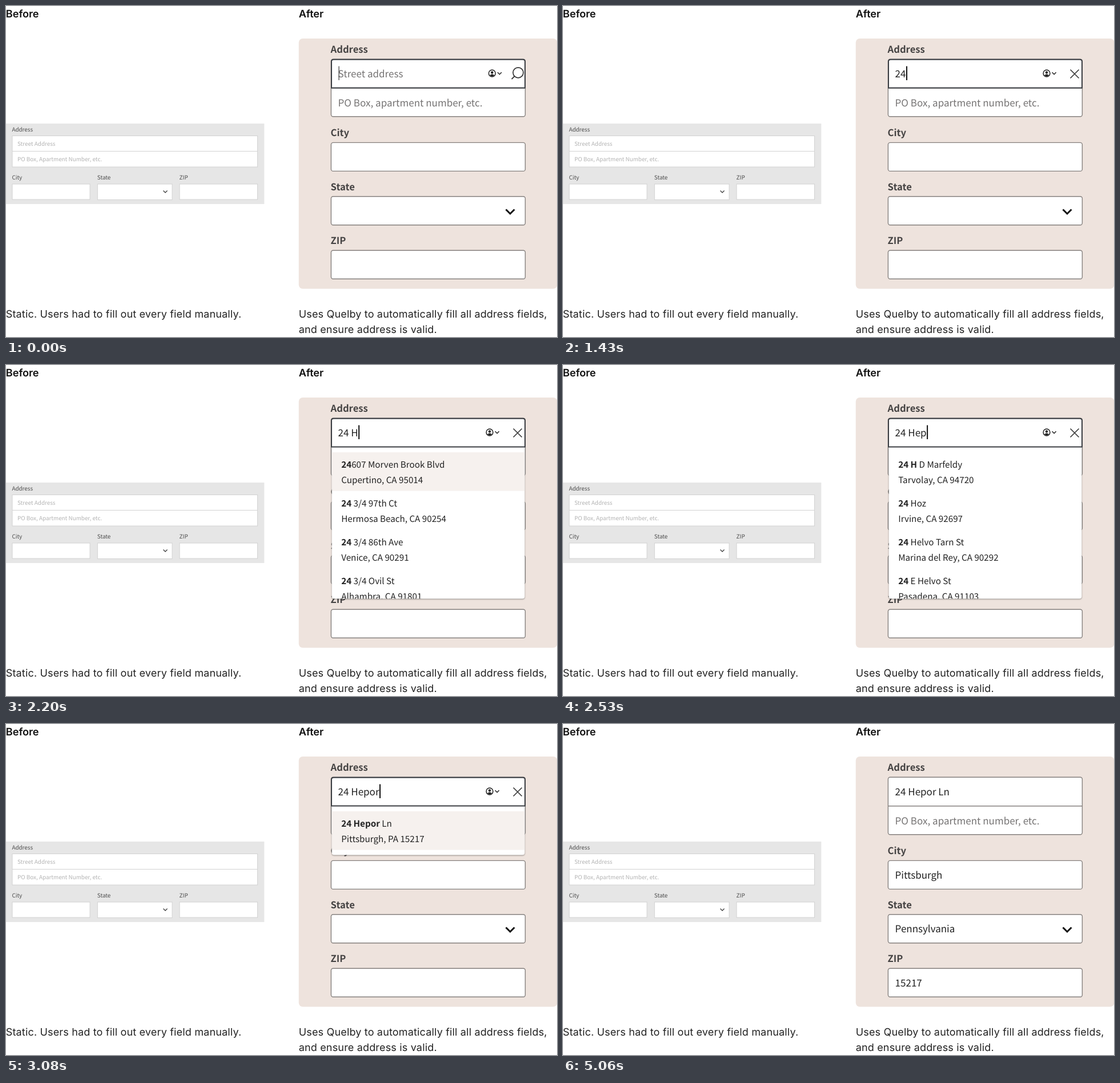
Animation of 965x580 px, one loop 7590 ms. Source, as an HTML page:

```html
<!DOCTYPE html>
<html lang="en">
<head>
<meta charset="utf-8">
<title>Address form, before and after</title>
<style>
  html, body { margin: 0; width: 100%; height: 100%; overflow: hidden; background: #fff; }
  svg { display: block; }
  text {
    font-family: "Noto Sans CJK JP", "Noto Sans CJK SC", "Noto Sans CJK", "Noto Sans", sans-serif;
    text-rendering: geometricPrecision;
    white-space: pre;
  }
  .page { font-family: Inter, sans-serif; font-optical-sizing: none; }
  .menu { filter: drop-shadow(0 1px 1.2px rgba(0, 0, 0, .4)); }
</style>
</head>
<body>
<svg id="stage" width="965" height="580" viewBox="0 0 965 580">
  <g id="fixed"></g>
  <g id="live"></g>
</svg>
<script>
const LOOP = 7590, TEXT_X = 581.6;
const INK = '#222', LABEL = '#454343', HINT = '#757373', EDGE = '#85807e';
const fixed = document.getElementById('fixed');
const live = document.getElementById('live');

const text = (x, y, s, size, fill, attrs = '') =>
  `<text x="${x}" y="${y}" font-size="${size}" fill="${fill}" ${attrs}>${s}</text>`;
const box = (x, y, w, h, fill, attrs = '') =>
  `<rect x="${x}" y="${y}" width="${w}" height="${h}" fill="${fill}" ${attrs}/>`;
const line = (d, color, width, attrs = '') =>
  `<path d="${d}" fill="none" stroke="${color}" stroke-width="${width}" ${attrs}/>`;

const heading = (x, s) => text(x, 20.4, s, 18.15, '#111', 'class="page" font-weight="600"');
const caption = (x, y, s) => text(x, y, s, 18, '#222', 'class="page" letter-spacing=".17"');
const small = (x, y, s, fill = '#4c4c4c') => text(x, y, s, 9.87, fill);
const smallField = (x, y, w, h) => box(x, y, w, h, '#fff', 'stroke="#d2d2d2"');
const label = (y, s) => text(568.6, y, s, 16.6, LABEL, 'font-weight="700"');
const entry = (y, s, fill = INK) => text(TEXT_X, y, s, 17, fill);
const field = (y, h = 50) =>
  box(569.4, y, 340, h, '#fff', `rx="3.5" stroke="${EDGE}" stroke-width="1.4"`);

fixed.innerHTML =
  heading(-.3, 'Before') + heading(512.7, 'After') +
  caption(-.3, 546, 'Static. Users had to fill out every field manually.') +
  caption(512.7, 546, 'Uses Quelby to automatically fill all address fields,') +
  caption(512.7, 573, 'and ensure address is valid.') +

  box(0, 206, 452.3, 141, '#e6e6e6') +
  small(10.4, 219.6, 'Address') +
  smallField(11, 227.5, 429.5, 54.5) + line('M11 254.5H440.5', '#d2d2d2', 1) +
  small(20, 245, 'Street Address', '#b3b3b3') +
  small(20, 272.4, 'PO Box, Apartment Number, etc.', '#b3b3b3') +
  small(10.4, 304.4, 'City') + smallField(11, 312, 136, 27) +
  small(159.8, 304.4, 'State') + smallField(160.3, 312, 130.7, 27.5) +
  small(303.6, 304.4, 'ZIP') + smallField(304, 312, 136.5, 27) +
  line('M275.5 323.5L279 327L282.5 323.5', '#444', 1.4) +

  box(512.7, 57, 452.6, 438.5, '#eee3dd', 'rx="7"') +
  label(82, 'Address') + field(93.3, 100.4) +
  line('M569.4 143.8H909.4', EDGE, 1.4) +
  entry(175.9, 'PO Box, apartment number, etc.', HINT) +
  label(228.3, 'City') + field(239.4) +
  label(322.7, 'State') + field(333.8) +
  label(417.1, 'ZIP') + field(428.2) +
  line('M875.5 356.5L883 364L890.5 356.5', '#111', 3);

// Each suggestion: matched part, rest of the street, city
const wide = [
  ['24', '607 Morven Brook Blvd', 'Cupertino, CA 95014'],
  ['24', ' 3/4 97th Ct', 'Hermosa Beach, CA 90254'],
  ['24', ' 3/4 86th Ave', 'Venice, CA 90291'],
  ['24', ' 3/4 Ovil St', 'Alhambra, CA 91801'],
];
const narrow = [
  ['24 H', ' D Marfeldy', 'Tarvolay, CA 94720'],
  ['24', ' Hoz', 'Irvine, CA 92697'],
  ['24', ' Helvo Tarn St', 'Marina del Rey, CA 90292'],
  ['24', ' E Helvo St', 'Pasadena, CA 91103'],
];
const single = [['24 Hepor', ' Ln', 'Pittsburgh, PA 15217']];

const WARM = '#f6f1ee', HOVER = '#ededee';
// Start time, typed text, suggestions, colour of the active suggestion
const steps = [
  [0, ''],
  [1100, '2'],
  [1430, '24'],
  [1540, '24', wide],
  [1760, '24 ', wide],
  [1870, '24 ', wide, WARM],
  [2090, '24 H', wide, WARM],
  [2310, '24 He', narrow],
  [2530, '24 Hep', narrow],
  [2750, '24 Hepo', narrow],
  [2860, '24 Hepor', narrow],
  [2970, '24 Hepor', single],
  [3080, '24 Hepor', single, WARM],
  [4510, '24 Hepor', single, HOVER],
];
const FILLED = 4620;

function caretOpacity(t) {
  if (t < 110) return .5;
  if (t < 1100) return t >= 440 && t < 770 ? 1 : 0;
  if (t < 3520 || t >= 4290) return 1;
  return Math.abs(Math.cos(Math.PI * (Math.floor((t - 3520) / 110) + 1) / 8));
}

function menu(items, active) {
  const bottom = items.length > 1 ? 409.6 : 229.6;
  const shape = `M570.6 144H908.4V${bottom - 4}q0 4 -4 4H574.6q-4 0 -4 -4Z`;
  const rows = items.map(([match, rest, city], i) => {
    const y = 179.6 + 68 * i;
    return text(587.2, y, `<tspan font-weight="700">${match}</tspan>${rest}`, 15.23, INK) +
      text(587.2, y + 27.6, city, 15.23, INK);
  }).join('');
  return `<clipPath id="cut"><path d="${shape}"/></clipPath>
    <path class="menu" d="${shape}" fill="#fff"/>
    <g clip-path="url(#cut)">${active ? box(570.6, 153, 337.8, 67.6, active) : ''}${rows}</g>`;
}

const account = x =>
  `<g transform="translate(${x} 118)">
    <circle r="5.9" fill="#fff" stroke="#222" stroke-width="1.5"/>
    <circle cy="-1.5" r="2.2" fill="#222"/>
    <path d="M-4 3.6Q0 -.6 4 3.6Q0 7 -4 3.6Z" fill="#222"/>
    <path d="M9.6 -1.8L13.1 1.7L16.6 -1.8" fill="none" stroke="#222" stroke-width="1.5"/>
  </g>`;

function editing([, typed, items, active]) {
  const action = typed
    ? line('M888.5 111.5L903.5 126.5M903.5 111.5L888.5 126.5', '#3c3c3c', 1.7)
    : line('M890.5 123.2L885.6 128.2', '#333', 1.9) +
      '<circle cx="897" cy="116.8" r="9" fill="none" stroke="#333" stroke-width="1.7"/>';
  return (items ? menu(items, active) : '') +
    line('M570 143.4V97.5q0 -3.7 3.7 -3.7H905.3q3.7 0 3.7 3.7V143.4Z', '#3b3e43', 2) +
    (typed ? '' : entry(124.8, 'Street address', HINT)) +
    entry(124.8, typed, INK).replace('<text', '<text id="typed"') +
    account(typed ? 847 : 851.3) + action +
    box(TEXT_X, 105.5, 2, 24.5, '#111', 'id="caret"');
}

const filled =
  entry(124.8, '24 Hepor Ln') + entry(270.9, 'Pittsburgh') +
  entry(365.3, 'Pennsylvania') + entry(459.7, '15217');

let shown;
function render(t) {
  const step = t < FILLED ? steps.findLast(s => s[0] <= t) : filled;
  if (step !== shown) {
    shown = step;
    live.innerHTML = step === filled ? filled : editing(step);
    if (step !== filled) {
      const width = step[1] ? document.getElementById('typed').getComputedTextLength() : 0;
      document.getElementById('caret').setAttribute('x', TEXT_X + width + .5);
    }
  }
  if (step !== filled) document.getElementById('caret').setAttribute('opacity', caretOpacity(t));
}

const start = performance.now();
function tick(now) {
  render(Math.max(0, now - start) % LOOP);
  requestAnimationFrame(tick);
}
render(0);
requestAnimationFrame(tick);
</script>
</body>
</html>
```
